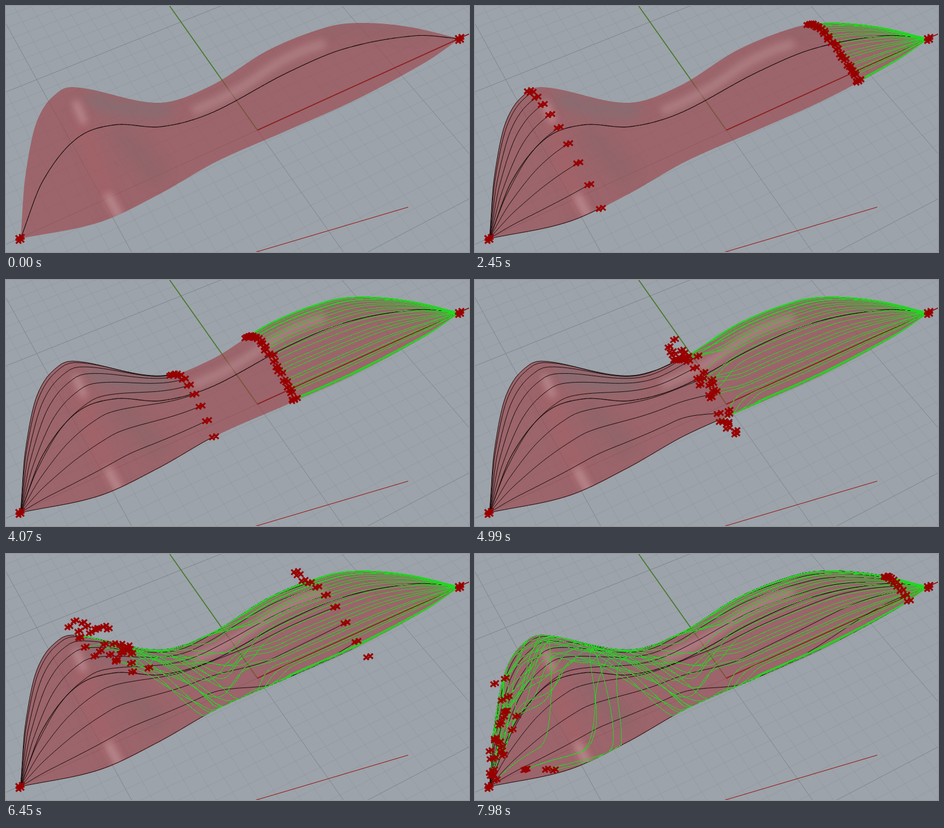
Recreate the animation shown at these times as an HTML page. Size 792 by 422 pixels, loop 8000 ms.

```html
<!DOCTYPE html>
<html lang="en">
<head>
<meta charset="utf-8">
<title>Curves growing over a surface</title>
<style>
html, body { margin: 0; width: 100%; height: 100%; overflow: hidden; background: #9ca3aa; }
svg { display: block; width: 792px; height: 422px; }
path, line { fill: none; }
</style>
</head>
<body>
<svg viewBox="0 0 792 422">
  <defs>
    <clipPath id="clip"><path id="clipShape"/></clipPath>
    <filter id="soft" x="-50%" y="-50%" width="200%" height="200%"><feGaussianBlur stdDeviation="10"/></filter>
    <filter id="glow" x="-50%" y="-50%" width="200%" height="200%"><feGaussianBlur stdDeviation="6"/></filter>
  </defs>
  <rect width="792" height="422" fill="#9ca3aa"/>
  <path id="minor" stroke="#9199a0" stroke-width=".8"/>
  <path id="major" stroke="#7f858b"/>
  <line x1="430" y1="213" x2="792" y2="48" stroke="#8c1212" stroke-width="1.6"/>
  <line x1="280" y1="0" x2="430" y2="213" stroke="#487a2c" stroke-width="1.7"/>
  <path id="surface" style="fill:#9c3c42" fill-opacity=".6"/>
  <g clip-path="url(#clip)">
    <g filter="url(#soft)" stroke-linecap="round">
      <path d="M150 160Q210 185 270 178" stroke="#7d7076" stroke-width="26" opacity=".6"/>
      <path d="M200 225L255 285" stroke="#846468" stroke-width="40" opacity=".35"/>
      <path d="M540 40Q620 38 700 45" stroke="#8a6468" stroke-width="14" opacity=".6"/>
      <path d="M125 190Q150 270 185 345" stroke="#ae5f63" stroke-width="26" opacity=".35"/>
    </g>
    <g filter="url(#glow)" stroke="#c0969b" stroke-linecap="round">
      <path d="M120 168L132 196" stroke-width="13" opacity=".7"/>
      <path d="M176 328L192 358" stroke-width="15" opacity=".7"/>
      <path d="M325 178Q385 155 435 118T540 66" stroke-width="15" opacity=".5"/>
    </g>
  </g>
  <line x1="430" y1="213" x2="776" y2="55.5" stroke="#8c2022" stroke-width="1.4"/>
  <line x1="428" y1="422" x2="688" y2="345" stroke="#9c0c0c"/>
  <path id="middle" stroke="#120808" stroke-width="1.1"/>
  <path id="dark" stroke="#1c0e0e"/>
  <path id="green" stroke="#22d622" shape-rendering="crispEdges"/>
  <path id="marks" stroke="#980000" stroke-width="3.1"/>
</svg>
<script>
const LOOP = 8000, X0 = 25, X1 = 776;
const el = id => document.getElementById(id);
const draw = (id, d) => el(id).setAttribute("d", d);
const clamp = (v, lo, hi) => Math.min(Math.max(v, lo), hi);
const mix = (a, b, f) => a + (b - a) * f;
const ease = (from, to, v) => { const f = clamp((v - from) / (to - from), 0, 1); return f * f * (3 - 2 * f); };
const noise = k => { const v = Math.sin(k * 91.7 + 3.1) * 43758.5; return v - Math.floor(v) - .5; };
const line = pts => "M" + pts.map(p => p[0].toFixed(1) + " " + p[1].toFixed(1)).join("L");

// Hermite spline y(x) through a few points.
function spline(...keys) {
  const last = keys.length - 1;
  const slope = i => {
    const a = keys[Math.max(i - 1, 0)], b = keys[Math.min(i + 1, last)];
    return (b[1] - a[1]) / (b[0] - a[0]);
  };
  return x => {
    let i = 0;
    while (i < last - 1 && x > keys[i + 1][0]) i++;
    const a = keys[i], b = keys[i + 1], span = b[0] - a[0];
    const f = clamp((x - a[0]) / span, 0, 1), g = 1 - f;
    return g * g * (1 + 2 * f) * a[1] + f * f * (3 - 2 * f) * b[1]
      + span * f * g * (g * slope(i) - f * slope(i + 1));
  };
}

const upper = spline([25, 399], [32, 300], [52, 200], [90, 147], [125, 140], [262, 166],
  [350, 137], [450, 75], [550, 36], [610, 29], [690, 36], [776, 56]);
const lower = spline([25, 399], [160, 371], [260, 324], [360, 267], [480, 214], [600, 160], [720, 95], [776, 56]);
const middle = spline([25, 399], [62, 302], [120, 228], [185, 204], [265, 207], [350, 184],
  [480, 115], [580, 73], [700, 51], [776, 56]);

function sweep(curve) {
  const pts = [];
  for (let x = X0; x < X1; x += x < 60 ? .25 : 2) pts.push([x, curve(x)]);
  return [...pts, [X1, curve(X1)]];
}

// Ribs start on the upper edge and run away from a vanishing point to the lower edge.
const VANISH = [-1194, -1966];
let length = 0;
const ribs = sweep(upper).map(([x, y], i, edge) => {
  if (i) length += Math.hypot(x - edge[i - 1][0], y - edge[i - 1][1]);
  const slope = (y - VANISH[1]) / (x - VANISH[0]);
  let lo = x, hi = Math.min(x + 160, X1);
  for (let k = 0; k < 20; k++) {
    const mid = (lo + hi) / 2;
    if (y + slope * (mid - x) < lower(mid)) lo = mid; else hi = mid;
  }
  return { at: length, a: [x, y], b: [lo, lower(lo)] };
});

// Point at distance s along the upper edge and fraction v across; v may leave 0..1.
function place(s, v) {
  s = clamp(s, 0, length);
  let lo = 0, hi = ribs.length - 1;
  while (hi - lo > 1) {
    const mid = (lo + hi) >> 1;
    if (ribs[mid].at <= s) lo = mid; else hi = mid;
  }
  const p = ribs[lo], q = ribs[hi], f = (s - p.at) / (q.at - p.at);
  const bulge = 27 * Math.sin(Math.PI * s / length) * Math.sin(Math.PI * clamp(v, 0, 1) ** .8);
  const axis = c => mix(mix(p.a[c], q.a[c], f), mix(p.b[c], q.b[c], f), v);
  return [axis(0), axis(1) - bulge];
}

// After the two groups meet, walkers spread past the edges and settle again.
const MEET = 107;
const spread = (v, n) => .5 + (v - .5) * (1 + .5 * ease(MEET, 137, n) * (1 - ease(137, 225, n)));

// Each walker maps a step to [distance, fraction across].
const darkWalkers = Array.from({ length: 10 }, (_, i) => n =>
  [4.55 * n - .0019 * n * n, spread((i / 9) ** 1.5, n)]);

const GREEN = 30;
const greenWalkers = Array.from({ length: GREEN }, (_, i) => {
  const start = clamp(.5 - .5 * Math.cos(Math.PI * i / (GREEN - 1)) + .05 * noise(i), 0, 1);
  const pace = noise(i + 40), phase = 6 * noise(i + 80), falls = i % 6 === 4;
  return n => {
    const drift = 1.7 * pace * Math.max(n - MEET, 0) + 6 * noise(i + 120) * Math.min(n / 40, 1);
    let v = start * (1 - .62 * ease(130, 165, n));
    v += .06 * (Math.sin(n * .18 + phase) - Math.sin(phase)) * ease(100, 130, n);
    if (falls) v = mix(v, .85 + .3 * pace, ease(163, 195, n));
    return [length - 3.2 * n - .0035 * n * n + drift, spread(v, n)];
  };
});

function trail(walker, now) {
  const pts = [];
  for (let n = 0; n < now + 2; n += 2) {
    const [s, v] = walker(Math.min(n, now));
    pts.push(place(s, clamp(v, .004, .996)));
  }
  return line(pts);
}

const cross = (x, y) => `M${(x - 4.4).toFixed(1)} ${(y - 4.4).toFixed(1)}l8.8 8.8m0-8.8l-8.8 8.8`;
const twins = ([x, y], gap) => cross(x - gap, y + 1) + cross(x + gap, y - 1);
const anchor = (x, y) => twins([x, y - 2], 3) + twins([x, y + 3], 2.5);

function drawStill() {
  const shape = line([...sweep(upper), ...sweep(lower).reverse()]) + "Z";
  draw("surface", shape);
  draw("clipShape", shape);
  draw("middle", line(sweep(middle)));
  const ground = (a, b) => {
    const w = 1 - .0569 * a + .096 * b;
    return [(430 - 273.3 * a - 102 * b) / w, (213 + 101.2 * a - 183 * b) / w];
  };
  let minor = "", major = "";
  for (let i = -30; i <= 30; i++) {
    const k = i / 10;
    const d = line([ground(k, -3), ground(k, 3)]) + line([ground(-3, k), ground(3, k)]);
    if (i % 10) minor += d; else major += d;
  }
  draw("minor", minor);
  draw("major", major);
}

// Bursts of steps: start, end, count.
const bursts = [[340, 1140, 17], [1240, 2040, 25], [2060, 2860, 39], [2880, 3680, 20], [3740, 4460, 13],
  [4550, 5330, 18], [5360, 6160, 30], [6190, 6980, 28], [7010, 7810, 27], [7850, 7980, 5]];
const stepAt = t => bursts.reduce((n, [from, to, count]) =>
  t < from ? n : n + 1 + Math.floor(Math.min((t - from) / (to - from), 1) * (count - 1)), 0);

let shown = -1;
function render(t) {
  const now = stepAt(t);
  if (now === shown) return;
  shown = now;
  const marksOf = (walkers, gap) => walkers.map(walker => twins(place(...walker(now)), gap)).join("");
  const trailsOf = walkers => now ? walkers.map(walker => trail(walker, now)).join("") : "";
  const moving = now ? marksOf(darkWalkers, 3.5) + marksOf(greenWalkers, 2.5) : "";
  draw("marks", anchor(24, 399) + anchor(X1, 56) + moving);
  draw("dark", trailsOf(darkWalkers));
  draw("green", trailsOf(greenWalkers));
}

drawStill();
render(0);
const begin = performance.now();
function tick() {
  render((performance.now() - begin) % LOOP);
  requestAnimationFrame(tick);
}
requestAnimationFrame(tick);
</script>
</body>
</html>
```
